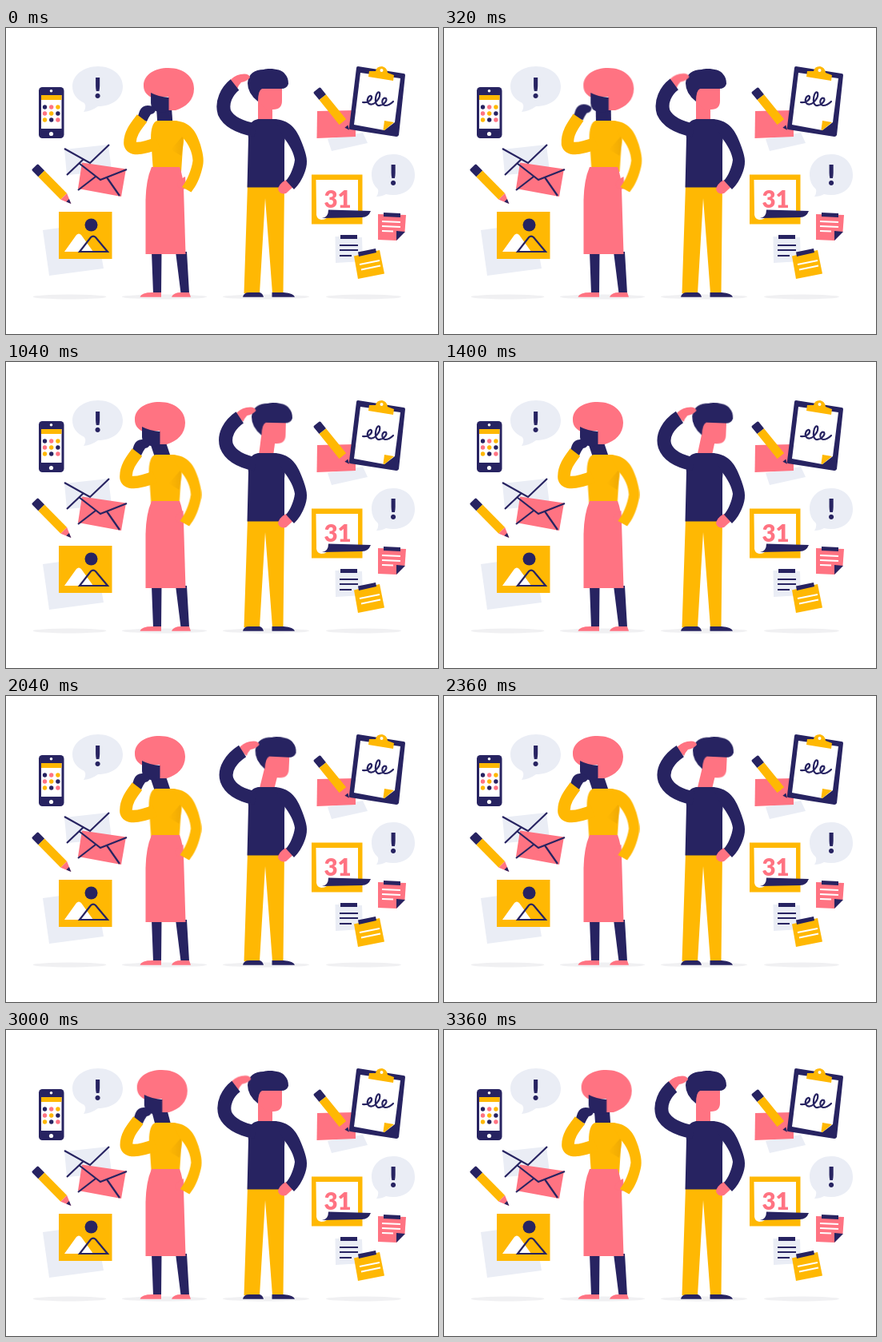
Animation, 540 px wide and 383 px high, one loop 3400 ms. Source, as an HTML page:

```html
<!DOCTYPE html>
<html lang="en">
<head>
<meta charset="utf-8">
<title>Two people thinking</title>
<style>
html, body { margin: 0; width: 100%; height: 100%; overflow: hidden; background: #fff; }
svg { display: block; width: 540px; height: 383px; }
.n { fill: #272361; } .y { fill: #ffb803; } .p { fill: #ff7382; }
.g { fill: #eaedf5; } .w { fill: #fff; } .s { fill: #f0f0f2; }
.ln { fill: none; stroke: #272361; stroke-width: 2.2; }
.rule { fill: none; stroke: #fff; stroke-width: 2; }
.limb { fill: none; stroke-width: 17; stroke-linejoin: round; }
text { font-family: Lato, sans-serif; font-weight: 900; text-anchor: middle; }

.move { animation: 3.4s infinite cubic-bezier(.45, 0, .4, 1); }
#wHead { animation-name: wHead; }
#wNeck { animation-name: wNeck; }
.wBody { animation-name: wBody; }
#wArm { animation-name: wArm; }
#wHand { animation-name: wHand; }
#mHead { animation-name: mHead; transform-origin: 328px 90px; }
#mNeck { animation-name: mNeck; }
#mArm { animation-name: mArm; }
#mHand { animation-name: mHand; }

/* woman: slow drift away, snap back to the chin, hold, wind up, snap out */
@keyframes wHead {
  0%, 100% { transform: none; animation-timing-function: linear; }
  18.5% { transform: translate(4.5px, 0); }
  28.5%, 78.5% { transform: translate(-11px, 0); }
  85% { transform: translate(-13px, 0); }
  93% { transform: translate(-1.8px, 0); animation-timing-function: linear; }
}
@keyframes wNeck {
  0%, 100% { d: path("M199 122 L197 92"); animation-timing-function: linear; }
  18.5% { d: path("M200 122 L201 92"); }
  28.5%, 78.5% { d: path("M197 122 L187 92"); }
  85% { d: path("M196 122 L185 92"); }
  93% { d: path("M199 122 L195.5 92"); animation-timing-function: linear; }
}
@keyframes wBody {
  0%, 100% { transform: none; animation-timing-function: linear; }
  18.5% { transform: translateX(1px); }
  28.5%, 78.5% { transform: translateX(-2.5px); }
  85% { transform: translateX(-3.5px); }
  93% { transform: translateX(-.5px); animation-timing-function: linear; }
}
@keyframes wArm {
  0%, 100% { d: path("M170 113 C164 121 154 132 155 145 C157 152 166 153 190 144"); animation-timing-function: linear; }
  18.5% { d: path("M166 111 C161 119 153 131 154 145 C156 152 166 153 191 144"); }
  28.5%, 78.5% { d: path("M164 113 C158 121 149 132 150 145 C152 152 162 153 186 144"); }
  85% { d: path("M162 113 C156 121 146 132 147 145 C149 152 160 153 185 144"); }
  93% { d: path("M170 113 C164 121 154 132 155 145 C157 152 166 153 190 144"); animation-timing-function: linear; }
}
@keyframes wHand {
  0%, 100% { transform: none; animation-timing-function: linear; }
  18.5% { transform: translate(-5px, -3px); }
  28.5%, 78.5% { transform: translate(-7px, 0); }
  85% { transform: translate(-9px, 0); }
  93% { transform: translate(0, 0); animation-timing-function: linear; }
}
/* man: hand snaps over and pushes the head, slow drift, snap back */
@keyframes mHead {
  0%, 27%, 78%, 100% { transform: none; }
  34% { transform: translateX(7px) rotate(2deg); animation-timing-function: linear; }
  67% { transform: translateX(9px) rotate(3deg); }
}
@keyframes mNeck {
  0%, 27%, 78%, 100% { d: path("M324 120 L324 90"); }
  34% { d: path("M325 120 L331 90"); animation-timing-function: linear; }
  67% { d: path("M325 120 L333 90"); }
}
@keyframes mArm {
  0%, 3%, 96%, 100% { d: path("M286 71 C276 79 269 93 273 106 C278 117 291 124 312 128"); }
  16%, 27%, 78%, 82% { d: path("M289 70 C278 78 271 92 275 105 C280 116 292 124 312 128"); }
  34% { d: path("M294 69 C280 78 272 92 276 105 C280 116 292 124 312 128"); animation-timing-function: linear; }
  67% { d: path("M296 69 C282 78 272 92 276 105 C280 116 292 124 312 128"); }
}
@keyframes mHand {
  0%, 3%, 96%, 100% { transform: none; }
  16%, 27%, 78%, 82% { transform: translate(2.5px, -1px); }
  34% { transform: translate(10px, -1px); animation-timing-function: linear; }
  67% { transform: translate(12px, -1px); }
}
</style>
</head>
<body>
<svg viewBox="0 0 540 383">
  <defs>
    <linearGradient id="shade"><stop offset="0" stop-color="#a06000" stop-opacity="0"/><stop offset="1" stop-color="#a06000" stop-opacity=".15"/></linearGradient>
    <g id="pencil">
      <path class="n" d="M-4.500 -5.500 H6 V5.500 H-4.500 Q-6 5.500 -6 4 V-4 Q-6 -5.500 -4.500 -5.500Z"/>
      <path class="y" d="M6 -5.500 H46 V5.500 H6Z"/>
      <path class="p" d="M46 -5.500 L59 0 L46 5.500Z"/>
      <path class="n" d="M53 -2.500 L59 0 L53 2.500Z"/>
    </g>
  </defs>

  <g class="s">
    <ellipse cx="79.500" cy="336.500" rx="46" ry="3"/>
    <ellipse cx="198" cy="336.500" rx="53" ry="3"/>
    <ellipse cx="325" cy="336.500" rx="54" ry="3"/>
    <ellipse cx="447" cy="336.500" rx="47" ry="3"/>
  </g>

  <!-- phone -->
  <rect class="n" x="41" y="74" width="31.500" height="64" rx="4.500"/>
  <rect class="w" x="44" y="84" width="25.500" height="42"/>
  <rect class="y" x="44" y="84" width="25.500" height="6"/>
  <circle class="w" cx="56.500" cy="78.800" r="1.800"/>
  <circle class="w" cx="56.500" cy="132.500" r="2.600"/>
  <g id="dots"></g>

  <!-- speech bubbles -->
  <path class="g" d="M115 48 C133 48 146 59 146 73 C146 88 133 98 115 98 Q107 104 97 105 Q101 99 98 94 Q83 87 83 73 C83 59 97 48 115 48Z"/>
  <text class="n" x="114.500" y="87.500" font-size="35">!</text>
  <path class="g" d="M484 158 C500 158 511 169 511 184 C511 199 500 209 484 209 Q479 209 475 208 Q470 211 463 211 Q466 207 465 202 Q457 195 457 184 C457 169 468 158 484 158Z"/>
  <text class="n" x="484" y="197" font-size="35">!</text>

  <!-- envelopes -->
  <path class="g" d="M73 152 L128 146 L132 179 L76 184Z"/>
  <path class="ln" d="M73 151 L105 169 L129 146 M97 164 L76 184"/>
  <path class="p" d="M95 168.500 L150 176.500 L144 211 L90 201Z"/>
  <path class="ln" d="M91 169 L118 190 L151 177 M112 186 L90 203 M126 187 L142 210"/>

  <use href="#pencil" transform="translate(40 178) rotate(45.500)"/>

  <!-- picture -->
  <path class="g" d="M46 253 L112 244 L122 301 L54 310Z"/>
  <rect class="y" x="66" y="230" width="66.500" height="59"/>
  <circle class="n" cx="106.500" cy="246.500" r="8"/>
  <path class="w" d="M73 280 L88 259 Q91 256 94 259 L109 280Z"/>
  <path class="ln" d="M92 280 L106 262 Q109 259 112 262 L127 280Z"/>

  <!-- card and clipboard -->
  <path class="g" d="M402 139 L446 131 L452 144 L407 154Z"/>
  <path class="p" d="M389 104 L437 103 L437 136 L388.500 138Z"/>
  <path class="n" d="M440 48 L497 57 Q499 57 499 59 L491 134 Q490 136 488 136 L430 127 Q428 126 429 124 L438 50 Q438 48 440 48Z"/>
  <path class="w" d="M443 56 L493 63 L486 118 L473 128 L435 121Z"/>
  <path class="y" d="M473 116 L485 118 L473 128 L471.500 127.500Z"/>
  <path class="y" d="M454 54 L462 54 Q463 48 470 48 Q476 49 477 56 L485 59 L484 66 L453 61Z"/>
  <circle class="w" cx="469.500" cy="53" r="2"/>
  <path class="ln" stroke-linecap="round" d="M446 93 C452 94 458 90 457 86 C454 82 449 91 454 95 C460 98 469 87 467 81 C463 77 459 94 465 97 C471 98 477 91 475 88 C470 86 468 96 474 97 Q479 97 484 92"/>
  <use href="#pencil" transform="translate(392 82) rotate(51)"/>

  <!-- calendar -->
  <rect class="y" x="382" y="183.500" width="63.500" height="62"/>
  <path class="w" d="M387.500 190 H440 V230 H404 Q403 240 394 240 Q387 239 388 230Z"/>
  <text class="p" x="414.500" y="224.500" font-size="29.500">31</text>
  <path class="n" d="M403 227.500 L456 229 Q453 237 445 237 L395 238 Q403 237 403 227.500Z"/>

  <!-- notes -->
  <path class="p" d="M465 233 L500 234 L498.500 255 L488 266 L465 265Z"/>
  <path class="n" d="M499 255 L488 254 V266Z"/>
  <path class="n" d="M472 231 L493 232 V237 L472 236Z"/>
  <path class="rule" d="M470 242 L493 243 M470 248 L493 249 M470 254 L484 254.500"/>
  <path class="g" d="M411.500 261 L445 262 L446 292 L412 294Z"/>
  <path class="n" d="M418 259 H439 V264 H418Z"/>
  <path class="ln" d="M417 272 H440 M417 278 H440 M417 285 H432"/>
  <path class="y" d="M435 285.500 L467 278 L473 307.500 L440 314Z"/>
  <path class="n" d="M440 280.500 L462 276 L463 281 L441 286Z"/>
  <path class="rule" d="M442 296 L467 291 M444 302.500 L468 297.500"/>

  <!-- woman -->
  <path class="n" d="M182 280 H194.500 L194 332 H184Z M212 280 H226 L229 332 H218.500Z"/>
  <path class="p" d="M167.500 336.800 Q169 331 183 331 H194 V336.800Z M207 336.800 Q209 331 219 331 H229 L231 336.800Z"/>
  <path id="wNeck" class="limb move" stroke="#272361" style="stroke-width:19px" d="M199 122 L197 92"/>
  <g id="wHead" class="move">
    <path class="p" d="M182 87 C174 83 172 78 172 72 C172 58 186 50 203 50 C222 50 235 61 235 76 C235 90 225 99 212 103 H203 V86Z"/>
    <path class="n" d="M181 81 Q190 86 203.500 87 V104 Q198 106 192 105 Q181 104 181 94Z"/>
  </g>
  <g class="wBody move">
    <path class="y" d="M189 116 H212 C222 119 224 134 221 150 L219 180 H184 L182 150 C180 136 181 118 189 116Z"/>
    <path fill="url(#shade)" d="M206 152 L221 135 V151 L219 160Z"/>
  </g>
  <g id="wHand" class="move">
    <path class="n" d="M164 113 L167 104 Q170 97 177 97 Q183 97 187 101 Q187 107 181 108 Q178 112 176 117Z"/>
  </g>
  <path id="wArm" class="limb move" stroke="#ffb803" style="stroke-width:15.500px" d="M170 113 C164 121 154 132 155 145 C157 152 166 153 190 144"/>
  <path class="p" d="M182 174 H217 Q221 184 222 200 L224.500 283 H174.500 V215 Q175 190 182 174Z"/>
  <g class="wBody move">
    <path class="p" d="M224 186 Q215 190 214 197 Q217 203 225 201Z"/>
    <path class="y" d="M210 116 C231 117 238 130 243 146 C247 160 248 167 245 177 C242 189 238 197 231.500 205.500 L220 199 C226 191 232 178 233.500 166 C233 156 229 146 220 136Z"/>
  </g>

  <!-- man -->
  <path class="y" d="M302 196 H348 L346.500 332 H333 L324 213 L317 332 H297.500Z"/>
  <path class="n" d="M296 336.800 Q297 331 304 331 H317 Q321 332 322 336.800Z M332.500 331 H347 Q360 332 361 336.800 H332.500Z"/>
  <path id="mNeck" class="limb move" stroke="#ff7382" style="stroke-width:18px" d="M324 120 L324 90"/>
  <g id="mHead" class="move">
    <path class="p" d="M315 74 H345 V91 Q345 102 334 102 H326 L315 92Z"/>
    <path class="n" d="M315 92 Q302 82 302 69 C303 57 311 52 322 52 C329 50 345 51 349 58 Q353 62 353 70 Q351 76 344 76 H320 Q315 78 315 92Z"/>
  </g>
  <path class="n" d="M315 114 H337 C347 118 350 132 348 146 V199.500 H301.500 L303 138 C302 122 306 116 315 114Z"/>
  <path class="p" d="M350 190 Q341 195 340 202 Q342 209 350 207 L361 197Z"/>
  <path class="n" d="M335 114 C354 115 363 125 370 144 C376 160 378 167 374 179 C370 190 366 196 360 202 L350 191 C355 186 360 174 361 165 C360 157 355 147 347 137Z"/>
  <g id="mHand" class="move">
    <path class="p" d="M279 67 Q284 60 293 58 Q304 56 305 62 Q301 67 294 68 Q291 71 289 76Z"/>
  </g>
  <path id="mArm" class="limb move" stroke="#272361" d="M286 71 C276 79 269 93 273 106 C278 117 291 124 312 128"/>
</svg>
<script>
// app icons on the phone: three colours in turn
const tints = ['n', 'p', 'y'];
let icons = '';
for (let i = 0; i < 9; i++) {
  const col = i % 3, row = Math.floor(i / 3);
  icons += `<circle class="${tints[(col + row) % 3]}" cx="${48.5 + col * 8.2}" cy="${99 + row * 8}" r="2.700"/>`;
}
document.getElementById('dots').innerHTML = icons;
</script>
</body>
</html>
```
